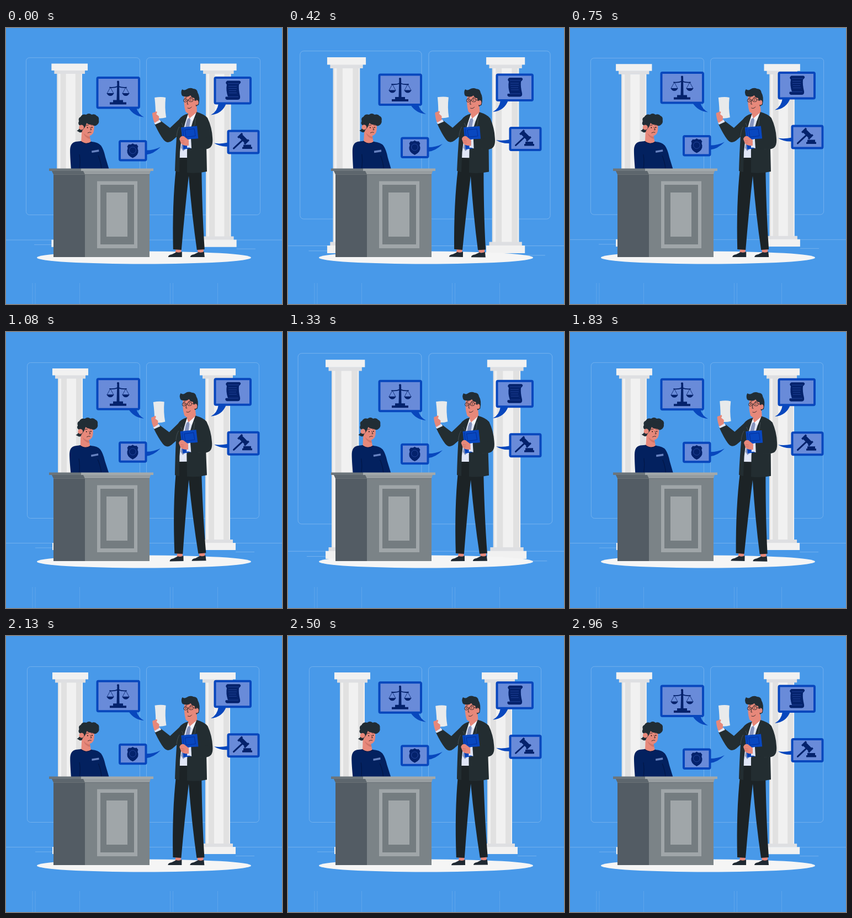
An HTML page that plays this animation: 500x500 px, repeating every 3000 ms.

```html
<!DOCTYPE html>
<html lang="en">
<head>
<meta charset="utf-8">
<title>Courtroom</title>
<style>
html, body { margin: 0; height: 100%; overflow: hidden; background: #4899e9; }
svg { display: block; width: 100%; height: 100%; }
.line { fill: none; stroke: #7db6ef; stroke-width: .8; }
.skin { fill: #e7887a; }
.hair { fill: #212d35; }
.suit { fill: #232d31; }
.navy { fill: #04226c; }
.ink { fill: none; stroke: #04226c; stroke-linecap: round; }
.face { fill: none; stroke: #2a2528; stroke-width: .9; stroke-linecap: round; }
.box { fill: #698bd9; stroke: #0847bd; stroke-width: 4; }
.tail { fill: #0847bd; }
</style>
</head>
<body>
<svg viewBox="0 0 500 500">
  <defs>
    <g id="column">
      <path fill="#f1f1f1" d="M10 18h45v293H10z"/>
      <path fill="#e1e1e1" d="M10 18h2v293h-2zM16 18h10v293H16zM43 18h10v293H43z"/>
      <path fill="#dedfe2" d="M5 12h55v6.500H5zM5 310h55v6.500H5z"/>
      <path fill="#f1f1f1" d="M0 0h65v12.500H0zM0 316h65v13H0z"/>
    </g>
  </defs>

  <path class="line" opacity=".55" d="M48 462v38M53 462v38M133.500 462v38M297.500 462v38M302.500 462v38M383.500 462v38"/>

  <g id="room">
    <rect class="line" x="38.500" y="55.500" width="204" height="282" rx="6"/>
    <rect class="line" x="254.500" y="55.500" width="204" height="282" rx="6"/>
    <path class="line" d="M-40 382.500h580M53 391h32M416 398.500h34"/>
    <use href="#column" x="84" y="66"/>
    <use href="#column" x="351" y="66"/>
  </g>

  <ellipse cx="250" cy="416" rx="194" ry="11.500" fill="#f5f5f5"/>

  <g id="witness">
    <path class="skin" d="M137 184L150 188L154 208Q146 214 136 207z"/>
    <path class="skin" d="M139 169Q150 163 158 170Q161 182 158 190Q154 197 147 195Q139 191 138 180z"/>
    <path fill="#cf7468" d="M140 190Q145 196 152 197L152 201Q143 199 140 190z"/>
    <path class="hair" d="M134 177Q129 174 132 169Q130 163 135 161Q138 155 145 157Q150 153 155 157Q161 155 164 159Q169 161 168 167Q169 173 164 176Q160 179 156 175Q150 176 146 172Q144 179 141 182L138 186Q138 190 133 189L128 186Q133 185 134 177z"/>
    <circle class="skin" cx="136.500" cy="180" r="4.500"/>
    <path class="face" d="M145 177q2-2 4-1M154 176q2-1 3 0M152.500 180l2 4.500h-2M148 190q3-2 6-1"/>
    <circle cx="147.500" cy="180.500" r=".9"/><circle cx="155.500" cy="180" r=".9"/>
    <path fill="#03215f" d="M135 205Q145 213 155 206Q167 207 172 213Q177 220 180 234L191 270H119Q116 236 116 222Q116 208 126 206z"/>
    <path d="M135 205q10 8 20 1M167 231q5 12 6 24M133 229q2 14 0 26" fill="none" stroke="#021747" stroke-width="1.200"/>
    <path fill="#6681bf" d="M155 222.500l13-2.200.4 3.600-13 2.200z"/>
  </g>

  <g id="desk">
    <path fill="#535c64" d="M86 262h57v153H86z"/>
    <path fill="#7b8387" d="M143 262h117v153H143z"/>
    <path fill="#5d666d" d="M83 259h60v6.500H86z"/>
    <path fill="#979da0" d="M140 259h122l-2 6.500H143z"/>
    <path fill="#6c757b" d="M78 254.500h58v4.500H78z"/>
    <path fill="#a3a9ab" d="M136 254.500h131v4.500H136z"/>
    <path fill="#697176" d="M86 265h174v1H86z"/>
    <path fill="#a0a6a9" d="M165 277.500h73v121.500h-73z"/>
    <path fill="#747c80" d="M171 284h61v108h-61z"/>
    <path fill="#a0a6a9" d="M182 298h38v80h-38z"/>
  </g>

  <g id="lawyer">
    <path class="skin" d="M308 400h10l-1 7h-10zM347 400h11v7h-10z"/>
    <path fill="#1f2932" d="M294 415q0-4 7-5l8-4q5 2 10-1v10zM334 415q0-4 7-5l8-4q5 2 10-1l1 10z"/>
    <path fill="#1c2326" d="M308 234H354Q355 330 360 401L346 402Q337 340 331 268Q324 330 318 402L303 401Q301 318 308 254z"/>
    <path fill="#e1e6f6" d="M331 154L345 153L340 200L329 235H314L316 190z"/>
    <path class="skin" d="M332 143L345 140L346 154L332 166L329 157z"/>
    <path fill="#f3f5fc" d="M329 155l3 9-7 4zM346 152l-14 12 7 5z"/>
    <path fill="#8694bd" d="M329 164l4-1 1 4-8 51-5 5-4-6 10-47z"/>
    <path class="suit" d="M330 155Q318 158 313 166L297 181L280 168L269 174Q278 193 285 202Q292 211 301 204L309 197Q307 226 306 259L314 261L315 225Q318 188 330 155z"/>
    <path class="suit" d="M345 152Q359 156 365 163Q373 180 374 199Q376 218 363 219L364 260Q346 264 328 262L328 222Q330 186 345 152z"/>
    <path d="M309 196q1-11 5-17M362 219q-9 1-19-2M318 172l4 8-4 7M343 163l-1 13-4 3" fill="none" stroke="#4b565b" stroke-width=".8"/>
    <path fill="#0847c0" d="M317 180L346 177.500L349 208L341 217L321 220z"/>
    <path d="M324 184.500l17-2 2 13-17 2zM320 182l4 35" fill="none" stroke="#04309a"/>
    <path fill="#e1e6f6" d="M328 212l13-1v4l-13 2z"/>
    <path class="suit" d="M335 201Q348 201 371 197Q379 218 359 220L335 218z"/>
    <path fill="#e1e6f6" d="M330 202l5-1 1 17-6-2z"/>
    <path class="skin" d="M314 201Q316 195 322 196L331 203V213Q321 214 317 209z"/>
    <path fill="none" stroke="#c96d62" stroke-width=".8" d="M317 204l6 1M318 208l5 0"/>

    <path fill="#e8eaeb" d="M269 126Q281 124 289 126Q287 145 290 162Q280 165 271 163Q271 143 269 126z"/>
    <path fill="#e1e6f6" d="M268 171l10-5 3 4-11 5z"/>
    <path class="skin" d="M265 157Q264 153 268 153L272 151Q275 152 272 156L277 160V167L269 172Q266 166 265 157z"/>

    <path class="skin" d="M323 121Q335 116 344 122L346 135Q344 148 338 153Q329 157 325 151Q321 138 323 121z"/>
    <path class="hair" d="M318 121Q316 115 319 111Q323 114 327 111Q333 107 339 110Q346 110 347 117Q352 125 349 139L344 142L341 127Q336 126 334 122Q329 126 323 124Q319 124 318 121z"/>
    <ellipse class="skin" cx="345" cy="135" rx="3.500" ry="4.500"/>
    <path class="face" d="M324 127l3-1M333 126q3-2 5 0M329 132l-1 6h2M329 145q4 2 7-2"/>
    <g class="face">
      <rect x="321.500" y="128.500" width="6.500" height="5.500" rx="2.500"/>
      <rect x="331" y="127.500" width="7.500" height="6" rx="2.500"/>
      <path d="M328 130.500h3M338.500 129.500l6 2"/>
    </g>
    <circle cx="325" cy="131" r=".8"/><circle cx="334.500" cy="130.500" r=".8"/>
  </g>

  <g id="bubbles">
    <path class="tail" d="M222 145Q231 160 250 162Q240 157 236 145z"/>
    <rect class="box" x="165.500" y="90.500" width="75.500" height="54.500" rx="2"/>
    <path class="navy" d="M201.500 97h3.500l.5 34h-5zM194 131h18v4h-18zM188 135h30v4h-30zM182.500 118.500h13q-2 5-6.500 5t-6.500-5zM210.500 118.500h13q-2 5-6.500 5t-6.500-5z"/>
    <circle class="navy" cx="203" cy="98" r="2"/>
    <path class="ink" stroke-width="1.800" d="M188 108q8 1 15-2q7 3 15 2"/>
    <path class="ink" stroke-width=".8" d="M183 119l6-11 6 11M211 119l6-11 6 11"/>

    <path class="tail" d="M385 137Q383 152 371 158Q392 156 399 137z"/>
    <rect class="box" x="378.500" y="90.500" width="64.500" height="46.500" rx="2"/>
    <path class="navy" d="M401 96H423Q427 98 424 101L422 103Q421 112 424 124Q425 130 420 130.500H400Q396 129 398 125H402Q398 113 400 103Q396 99 401 96z"/>
    <path d="M402 101h20M403 106h15M403 110h15M404 114h13M404 118h14M402 125h19" fill="none" stroke="#2749a0" stroke-width=".8"/>

    <path class="tail" d="M402 208Q388 211 377 209Q388 216 402 215z"/>
    <rect class="box" x="402.500" y="187" width="55" height="40" rx="2"/>
    <path class="ink" stroke-width="3" d="M412.500 218.500l16-15"/>
    <path class="navy" transform="rotate(45 430 201)" d="M423 197h14v8h-14zM420 195.500h3.500v11H420zM436.500 195.500h3.500v11h-3.500z"/>
    <path class="navy" d="M430 212h14v4h-14zM428 216h18v3.500h-18z"/>

    <path class="tail" d="M254 222Q268 222 280 216Q267 229 254 230z"/>
    <rect class="box" x="206" y="205.500" width="47.500" height="34.500" rx="2"/>
    <path class="navy" d="M229.500 209.500q3 3 7 1.500l3 4q-2 3 0 7q1 9-10 14q-11-5-10-14q2-4 0-7l3-4q4 1.500 7-1.500z"/>
    <circle cx="229.500" cy="222" r="6" fill="none" stroke="#2749a0" stroke-width=".9"/>
  </g>
</svg>
<script>
const LOOP = 3000, LEAD = 30;
const part = id => document.getElementById(id);
const room = part("room"), witness = part("witness"), lawyer = part("lawyer"), bubbles = part("bubbles");

// Heartbeat: two eased pulses, then a rest; [time, extra scale]
const beats = [[-30, 0], [270, .1], [870, 0], [1110, 0], [1290, .1], [1890, 0], [2970, 0], [3270, .1]];

function zoom(t) {
  const i = beats.findIndex(b => b[0] > t);
  const [t0, a] = beats[i - 1], [t1, b] = beats[i];
  const ease = (1 - Math.cos(Math.PI * (t - t0) / (t1 - t0))) / 2;
  return 1 + a + (b - a) * ease;
}

function draw(now) {
  const t = (now + LEAD) % LOOP;
  const p = t % 1500 / 1500;
  const sway = Math.asin(Math.sin(2 * Math.PI * p)) * 2 / Math.PI;
  const lift = 10 * (1 - Math.abs(1 - 2 * p));
  room.setAttribute("transform", `translate(249 230) scale(${zoom(t)}) translate(-249 -230)`);
  witness.setAttribute("transform", `rotate(${sway} 150 283)`);
  lawyer.setAttribute("transform", `rotate(${sway} 320 262)`);
  bubbles.setAttribute("transform", `translate(0 ${-lift})`);
}

const start = performance.now();
function tick() {
  draw(performance.now() - start);
  requestAnimationFrame(tick);
}
tick();
</script>
</body>
</html>
```
